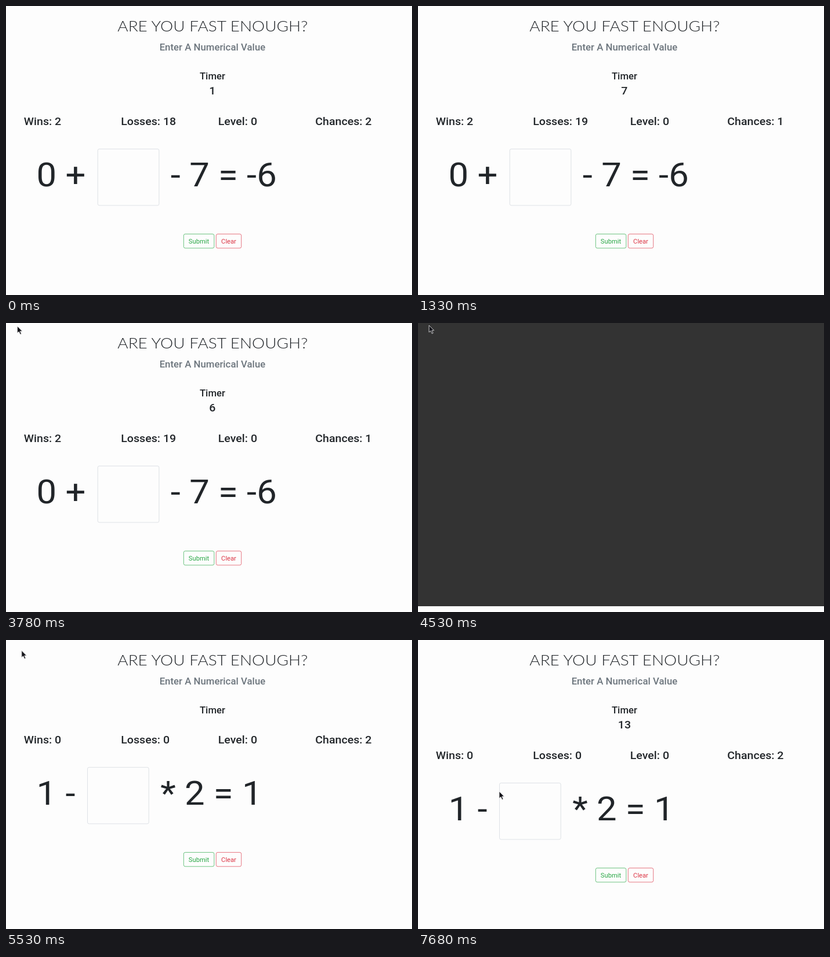
Recreate the animation shown at these times as an HTML page. Size 700 by 500 pixels, loop 8 s.

```html
<!DOCTYPE html>
<html lang="en">
<head>
<meta charset="utf-8">
<title>Are you fast enough?</title>
<style>
  html, body { margin: 0; width: 100%; height: 100%; overflow: hidden; background: #fdfdfd; }
  svg { display: block; width: 700px; height: 500px; }
  text { font-family: Roboto, sans-serif; fill: #212529; white-space: pre; }
  .title { font: 300 40px Lato, sans-serif; }
  .mid { text-anchor: middle; }
  .head { font-size: 24px; font-weight: 500; }
  .sub { fill: #6c757d; }
  .stat { font-size: 28px; font-weight: 500; }
  .sum { font-size: 88px; }
  .btn text { font-size: 16px; }
  .btn rect { fill: none; }
  .green rect { stroke: #28a745; } .green text { fill: #28a745; }
  .red rect { stroke: #dc3545; } .red text { fill: #dc3545; }
  #field { fill: none; stroke: #ced4da; }
  #dark { fill: #333; }
  #cursor { fill: #14141a; stroke: #f0f0f0; stroke-width: .8; }
</style>
</head>
<body>
<svg viewBox="0 0 700 500">
  <rect width="700" height="500" fill="#fdfdfd"/>
  <!-- A 1000 x 768 page, squeezed onto the stage -->
  <g transform="scale(.7 .651)">
    <text class="title mid" x="509" y="67">ARE YOU FAST ENOUGH?</text>
    <text class="head sub mid" x="508.5" y="118">Enter A Numerical Value</text>
    <text class="head mid" x="508.5" y="195">Timer</text>
    <text class="stat mid" id="timer" x="508.5" y="235"></text>
    <g id="board">
      <text class="stat" id="wins" x="44" y="316.5"></text>
      <text class="stat" id="losses" x="283.2" y="316.5"></text>
      <text class="stat" id="level" x="522.5" y="316.5"></text>
      <text class="stat" id="chances" x="761.8" y="316.5"></text>
      <text class="sum" id="before" x="75" y="479"></text>
      <rect id="field" y="380" width="151" height="150" rx="4"/>
      <text class="sum" id="after" y="479"></text>
      <g class="btn green">
        <rect x="437.6" y="606" width="75" height="37.5" rx="4"/>
        <text class="mid" x="475" y="631">Submit</text>
      </g>
      <g class="btn red">
        <rect x="517.6" y="606" width="62" height="37.5" rx="4"/>
        <text class="mid" x="548.6" y="631">Clear</text>
      </g>
    </g>
  </g>
  <polygon id="dark"/>
  <path id="cursor" d="M0 0V12L2.8 9.5 5 14.3 7 13.4 4.9 8.8H8.6Z"/>
</svg>
<script>
const LOOP = 8000;
const RELOAD = 4400, WIPE = 4690, READY = 4730;
const el = id => document.getElementById(id);

// [start ms, value]
const timerSteps = [[0, '1'], [125, '0'], [950, '7'], [1775, '6'],
  [WIPE, ''], [5690, '15'], [6520, '14'], [7340, '13']];

// [start ms, stats and puzzle]
const rounds = [
  [0, { losses: 18, chances: 2, before: '0 +', boxX: 226, after: '- 7 = -6' }],
  [125, { losses: 19, chances: 1, before: '0 +', boxX: 226, after: '- 7 = -6' }],
  [WIPE, { losses: 0, chances: 2, before: '1 -', boxX: 200.7, after: '* 2 = 1' }],
];

const covers = [
  [0, ''],
  [RELOAD, '0,0 700,0 700,490 0,490'],
  [WIPE, '0,0 700,0 700,295 430,293 232,131 0,131'],
  [READY, ''],
];

// [ms, x, y] of the pointer tip
const pointer = [[0, 19, -20], [2300, 19, -20], [2480, 20, 7], [3400, 20, 7],
  [4150, 19, 4], [5450, 19, 4], [5830, 56, 71], [6400, 127, 284],
  [6650, 128, 284], [7080, 140, 262], [LOOP, 140, 262]];

const stepAt = (steps, t) => steps.findLast(([start]) => start <= t)[1];

function pointerAt(t) {
  const i = pointer.findLastIndex(([ms]) => ms <= t);
  const [t0, x0, y0] = pointer[i];
  const [t1, x1, y1] = pointer[Math.min(i + 1, pointer.length - 1)];
  const k = t1 > t0 ? (t - t0) / (t1 - t0) : 0;
  return [x0 + (x1 - x0) * k, y0 + (y1 - y0) * k];
}

function setText(id, value) {
  if (el(id).textContent !== value) el(id).textContent = value;
}

function draw(t) {
  const timer = stepAt(timerSteps, t);
  const round = stepAt(rounds, t);
  setText('timer', timer);
  setText('wins', 'Wins: ' + (t < WIPE ? 2 : 0));
  setText('losses', 'Losses: ' + round.losses);
  setText('level', 'Level: 0');
  setText('chances', 'Chances: ' + round.chances);
  setText('before', round.before);
  setText('after', round.after);
  el('field').setAttribute('x', round.boxX);
  el('after').setAttribute('x', round.boxX + 179.5);
  // The empty timer line collapses until its first tick.
  el('board').setAttribute('transform', `translate(0 ${timer ? 0 : -41.6})`);
  el('dark').setAttribute('points', stepAt(covers, t));
  el('cursor').setAttribute('transform', `translate(${pointerAt(t)})`);
}

const begin = performance.now();
function tick() {
  draw((performance.now() - begin) % LOOP);
  requestAnimationFrame(tick);
}
tick();
</script>
</body>
</html>
```
